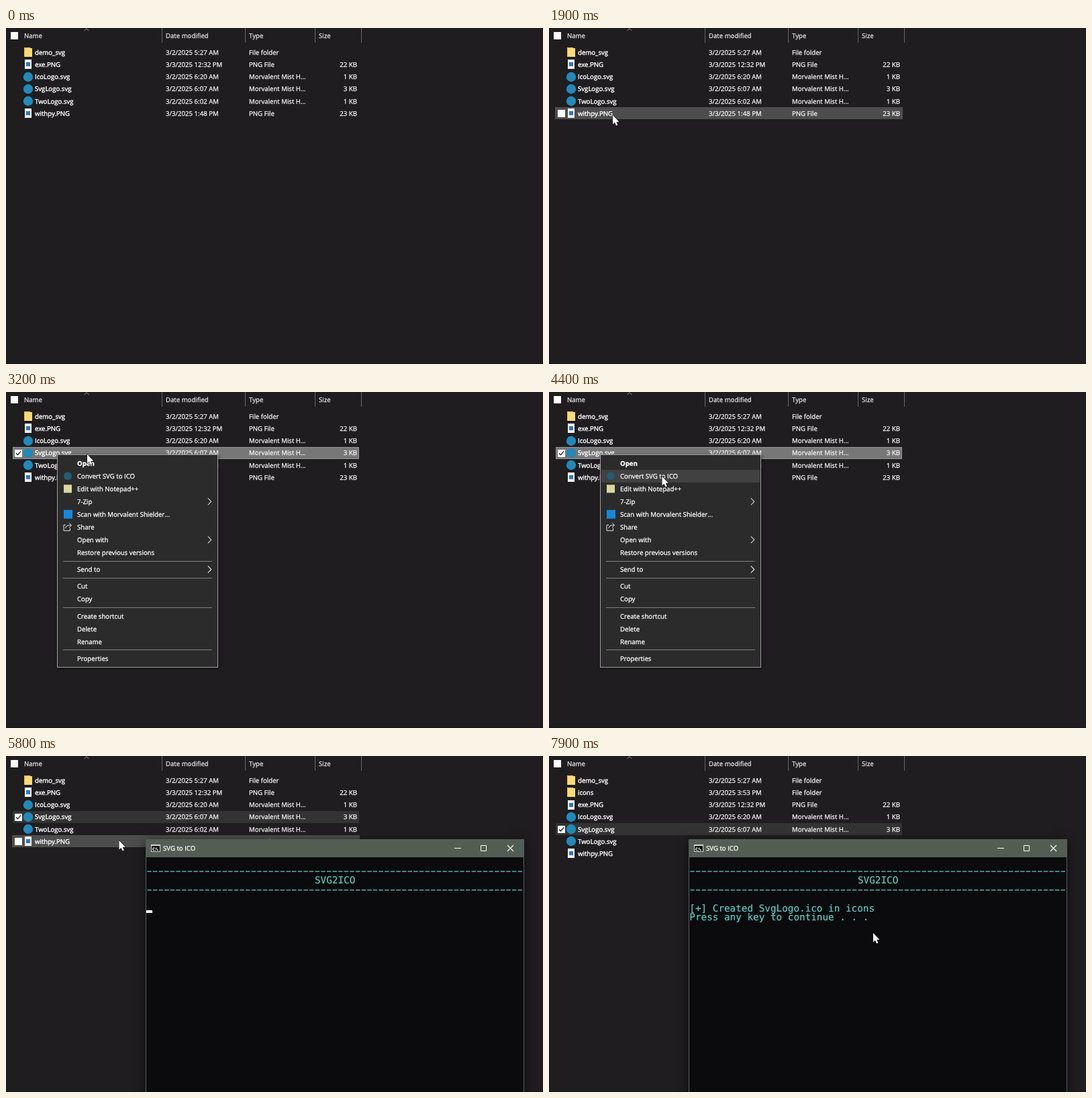
Write an HTML page with a canvas that moves like this. It is 800 px wide and 501 px high and loops after 8000 ms.

```html
<!DOCTYPE html>
<html lang="en">
<head>
<meta charset="utf-8">
<title>SVG to ICO</title>
<style>
html, body { margin: 0; width: 100%; height: 100%; overflow: hidden; background: #1f1d1f; }
canvas { display: block; }
</style>
</head>
<body>
<canvas id="stage" width="800" height="501"></canvas>
<script>
const ctx = document.getElementById('stage').getContext('2d');
const LOOP = 8000, STEP = 100;
const UI = '"Open Sans", "Noto Sans", sans-serif';
const MONO = '"DejaVu Sans Mono", monospace';
const TEAL = '#5fcfc9';

// Moments at which the scene changes, in ms
const CURSOR_IN = 1000, SELECT = 2800, MENU_OPEN = 2900, MENU_CLOSE = 5500,
  CONSOLE_OPEN = 5600, HEADER = 5700, CREATED = 6600, PROMPT = 6700, LIST_UPDATE = 6800;

// Pointer path: time, x, y
const PATH = [
  [1000, 772, 361], [1200, 441, 261], [1500, 250, 190], [1800, 110, 142], [1900, 95, 130],
  [2400, 73, 101], [2800, 76, 94], [2900, 76, 94], [3200, 121, 93], [3600, 168.5, 126],
  [7300, 168.5, 126], [7600, 430, 281], [7900, 483, 264]
];

const svgFile = (name, time, size) => ({ name, time: '3/2/2025 ' + time, type: 'Morvalent Mist H...', size, icon: 'svg' });
const pngFile = (name, time, size) => ({ name, time: '3/3/2025 ' + time, type: 'PNG File', size, icon: 'png' });
const folder = (name, time) => ({ name, time, type: 'File folder', size: '', icon: 'folder' });

const FILES = [
  folder('demo_svg', '3/2/2025 5:27 AM'),
  pngFile('exe.PNG', '12:32 PM', '22 KB'),
  svgFile('IcoLogo.svg', '6:20 AM', '1 KB'),
  svgFile('SvgLogo.svg', '6:07 AM', '3 KB'),
  svgFile('TwoLogo.svg', '6:02 AM', '1 KB'),
  pngFile('withpy.PNG', '1:48 PM', '23 KB')
];
const FILES_AFTER = [FILES[0], folder('icons', '3/3/2025 3:53 PM'), ...FILES.slice(1)];

// A dash marks a separator, a trailing ">" a submenu
const MENU = ['Open', 'Convert SVG to ICO', 'Edit with Notepad++', '7-Zip>',
  'Scan with Morvalent Shielder...', 'Share', 'Open with>', 'Restore previous versions', '-',
  'Send to>', '-', 'Cut', 'Copy', '-', 'Create shortcut', 'Delete', 'Rename', '-', 'Properties'];

function rect(x, y, w, h, color) {
  ctx.fillStyle = color;
  ctx.fillRect(x, y, w, h);
}

function circle(x, y, r, color) {
  ctx.fillStyle = color;
  ctx.beginPath();
  ctx.arc(x, y, r, 0, 7);
  ctx.fill();
}

function line(points, color, width = 1) {
  ctx.strokeStyle = color;
  ctx.lineWidth = width;
  ctx.beginPath();
  points.forEach(([x, y]) => ctx.lineTo(x, y));
  ctx.stroke();
}

// A hairline outline in the same colour gives the text its slightly heavy weight
function text(str, x, y, { color = '#f4f4f4', font = '9.65px ' + UI, align = 'left', weight = .3 } = {}) {
  ctx.font = font;
  ctx.textAlign = align;
  ctx.fillStyle = ctx.strokeStyle = color;
  ctx.lineWidth = weight;
  ctx.lineJoin = 'round';
  ctx.fillText(str, x, y);
  ctx.strokeText(str, x, y);
}

function pointerAt(t) {
  const next = PATH.findIndex(p => p[0] > t);
  if (next < 0) return PATH[PATH.length - 1].slice(1);
  const [t0, x0, y0] = PATH[next - 1], [t1, x1, y1] = PATH[next];
  const k = (t - t0) / (t1 - t0);
  return [x0 + (x1 - x0) * k, y0 + (y1 - y0) * k];
}

function drawHeader() {
  rect(7, 6, 11, 11, '#fff');
  line([[116.5, 4], [120, 0.8], [123.5, 4]], '#8c8c8c');
  [['Name', 27], ['Date modified', 238], ['Type', 362], ['Size', 466]]
    .forEach(([label, x]) => text(label, x, 14.8, { color: '#e2e2e2' }));
  [232, 356, 460, 529].forEach(x => rect(x, 0, 1, 22, '#686868'));
}

function drawFileIcon(kind, y) {
  if (kind === 'svg') circle(33, y, 7.2, '#2289b8');
  if (kind === 'folder') {
    rect(27, y - 7, 9, 14, '#e9b94f');
    rect(28, y - 6, 11, 13, '#fbd978');
  }
  if (kind === 'png') {
    rect(28, y - 7, 10, 14, '#f2f4f6');
    rect(30, y - 3, 6, 6, '#2d78c4');
  }
}

function drawFiles(t, hoverRow) {
  const focused = t < MENU_CLOSE;
  (t < LIST_UPDATE ? FILES : FILES_AFTER).forEach((file, i) => {
    const y = 36.2 + 18.2 * i, top = Math.round(y - 9);
    const selected = t >= SELECT && file.name === 'SvgLogo.svg';
    if (selected) rect(10, top, 516, 18, focused ? '#777' : '#333');
    else if (i === hoverRow) rect(9, top, 518, 18, '#4d4d4d');
    if (selected && focused) {
      ctx.strokeStyle = '#939393';
      ctx.lineWidth = 1;
      ctx.strokeRect(10.5, top + .5, 515, 17);
    }
    if (selected || i === hoverRow) rect(13, top + 4, 11, 11, '#fff');
    if (selected) line([[15, y + .5], [17.5, y + 3], [22, y - 2.5]], '#222', 1.3);
    drawFileIcon(file.icon, Math.round(y));
    text(file.name, 43, y + 3.6, { color: '#fff', weight: .4 });
    text(file.time, 238, y + 3.6);
    text(file.type, 362, y + 3.6);
    text(file.size, 523, y + 3.6, { align: 'right' });
  });
}

function drawMenuIcon(label, y) {
  if (label.startsWith('Convert')) circle(92, y, 6, '#245a73');
  if (label.startsWith('Edit')) rect(86, y - 6, 12, 12, '#d9d8a0');
  if (label.startsWith('Scan')) rect(86, y - 6.5, 13, 13, '#1787dc');
  if (label === 'Share') {
    line([[89, y - 3], [86, y - 3], [86, y + 5.5], [95.5, y + 5.5], [95.5, y + 2]], '#e6e6e6');
    line([[88.5, y + 2], [90, y - 1], [93, y - 2.5], [97, y - 2.5]], '#e6e6e6');
    line([[94, y - 6], [97.6, y - 2.5], [94, y + 1]], '#e6e6e6');
  }
}

function drawMenu(pointerY) {
  ctx.save();
  ctx.shadowColor = 'rgba(0,0,0,.5)';
  ctx.shadowBlur = 4;
  ctx.shadowOffsetX = ctx.shadowOffsetY = 1;
  rect(76, 93, 240, 318, '#a0a0a0');
  ctx.restore();
  rect(77, 94, 238, 316, '#2b2b2b');
  let y = 106.3;
  for (const item of MENU) {
    if (item === '-') {
      rect(85, Math.round(y - 6.6), 222, 1, '#808080');
      y += 6.2;
      continue;
    }
    const label = item.replace('>', '');
    if (pointerY > 96 && Math.abs(pointerY - y) < 9.5) rect(78, Math.round(y - 9.5), 236, 19, '#414141');
    drawMenuIcon(label, y);
    text(label, 106, y + 3.6, { color: '#fff', font: (item === 'Open' ? 'bold ' : '') + '9.65px ' + UI });
    if (item !== label) line([[300.8, y - 5], [305.8, y], [300.8, y + 5]], '#d8d8d8', 1.1);
    y += 19;
  }
}

function drawConsole(t) {
  ctx.save();
  ctx.shadowColor = 'rgba(0,0,0,.6)';
  ctx.shadowBlur = 14;
  ctx.shadowOffsetY = 3;
  rect(208, 124, 564, 390, '#5c615e');
  ctx.restore();
  rect(208, 124, 564, 27, '#525e54');
  rect(209, 151, 562, 350, '#0b0a0c');

  rect(216, 132, 14, 11, '#d8d8d8');
  rect(217, 134, 12, 8, '#080808');
  text('C:\\.', 218, 140.6, { color: '#fff', font: 'bold 6px ' + UI });
  text('SVG to ICO', 234, 141.2, { color: '#fff' });
  rect(668, 137, 10, 1, '#fff');
  ctx.strokeStyle = '#fff';
  ctx.lineWidth = 1;
  ctx.strokeRect(707.5, 133.5, 8, 8);
  line([[747, 133], [756, 142]], '#fff', 1.1);
  line([[756, 133], [747, 142]], '#fff', 1.1);

  const mono = { color: TEAL, font: '14.32px ' + MONO, weight: .15 };
  if (t >= HEADER) {
    ctx.setLineDash([6.4, 2.23]);
    [172.2, 199.8].forEach(y => line([[210.3, y], [771, y]], TEAL, 1.3));
    ctx.setLineDash([]);
    text('SVG2ICO', 460, 190, mono);
  }
  if (t >= CREATED) text('[+] Created SvgLogo.ico in icons', 209.3, 231.6, mono);
  if (t >= PROMPT) text('Press any key to continue . . .', 209.3, 245.4, mono);

  const caretOn = t >= 5780 && (t - 5780) % 1080 < 540;
  if (caretOn && t < CREATED) rect(209, 230, 9, 4, '#fff');
  else if (caretOn) rect(476, 244, 9, 4, '#fff');
}

function drawPointer(x, y) {
  const shape = [[0, 0], [0, 13.5], [3, 10.8], [5, 15.5], [7.3, 14.5], [5.3, 10], [9.3, 9.7]];
  ctx.beginPath();
  shape.forEach(([dx, dy]) => ctx.lineTo(x + dx, y + dy));
  ctx.closePath();
  ctx.strokeStyle = '#161616';
  ctx.lineWidth = 1.2;
  ctx.stroke();
  ctx.fillStyle = '#fff';
  ctx.fill();
}

function draw(t) {
  ctx.textRendering = 'geometricPrecision';
  rect(0, 0, 800, 501, '#1f1d1f');
  rect(0, 499, 800, 2, '#1a191b');
  const [x, y] = t >= CURSOR_IN ? pointerAt(t) : [-99, -99];
  const menuOpen = t >= MENU_OPEN && t < MENU_CLOSE;
  const overList = !menuOpen && x < 527 && (t < CONSOLE_OPEN || x < 208);
  drawHeader();
  drawFiles(t, overList ? Math.floor((y - 27.1) / 18.2) : -1);
  if (menuOpen) drawMenu(y);
  if (t >= CONSOLE_OPEN) drawConsole(t);
  drawPointer(x, y);
}

function frame() {
  const t = performance.now() % LOOP;
  draw(Math.floor(t / STEP) * STEP);
  requestAnimationFrame(frame);
}
frame();
</script>
</body>
</html>
```
